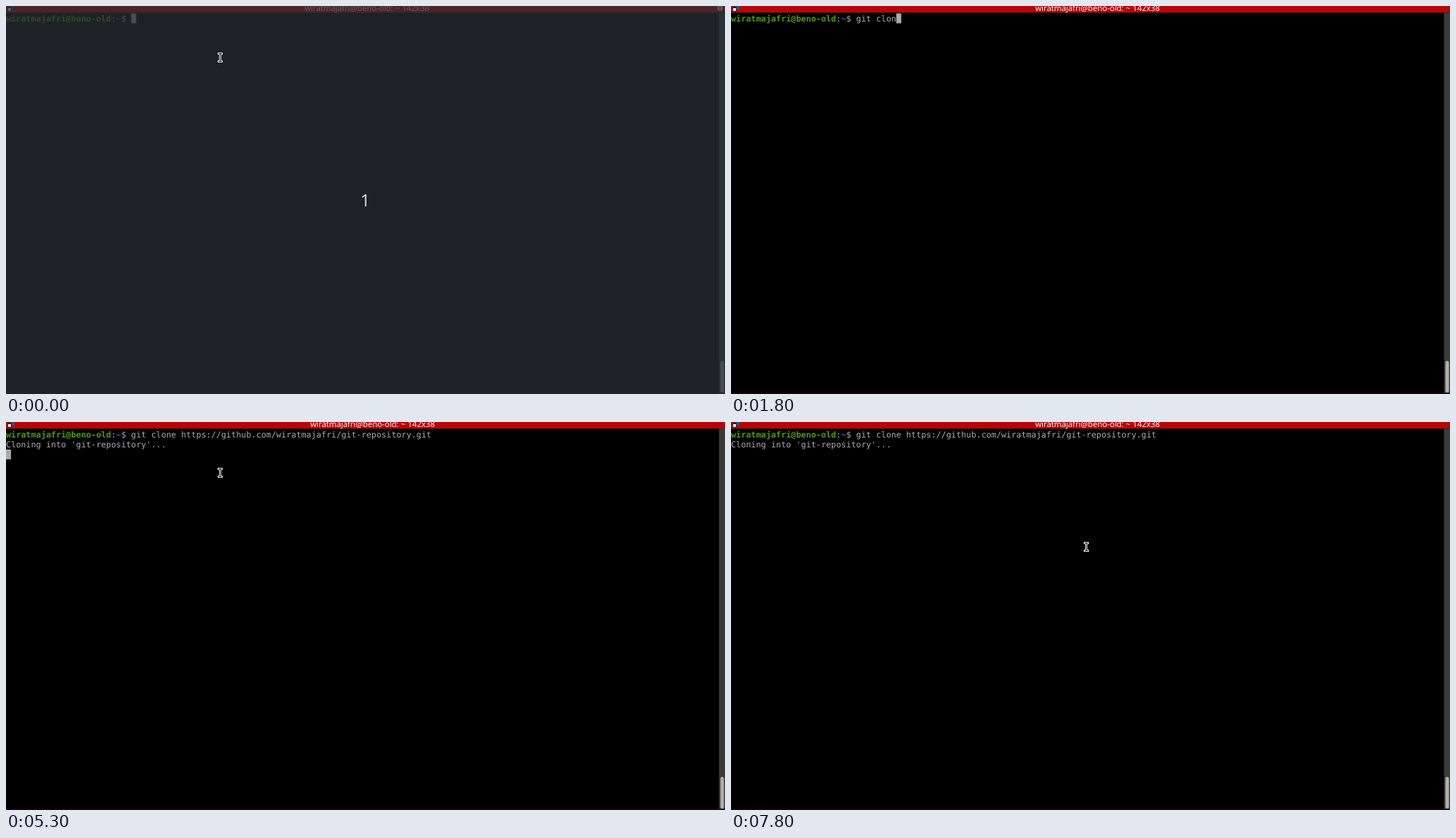
An HTML page for the animation above (8 s loop, 1019 by 550 pixels).

```html
<!DOCTYPE html>
<html lang="en">
<head>
<meta charset="utf-8">
<title>Cloning a repository</title>
<style>
  html, body { margin: 0; width: 100%; height: 100%; overflow: hidden; background: #000; }
  svg { display: block; width: 1019px; height: 550px; }
  text { white-space: pre; text-rendering: geometricPrecision; }
  .mono { font: 11.79px "DejaVu Sans Mono", monospace; fill: #aaa; }
  .user { font-weight: bold; fill: #4e9a06; }
  .path { font-weight: bold; fill: #3465a4; }
  .title { font: 11.45px "Open Sans", "Noto Sans", sans-serif; fill: #fff; text-anchor: middle; }
  .count { font: 24px "Noto Sans", "Open Sans", sans-serif; fill: #d3d4d5; text-anchor: middle; }
</style>
</head>
<body>
<svg viewBox="0 0 1019 550">
  <rect width="1019" height="550"/>

  <!-- title bar -->
  <rect width="1019" height="9.5" fill="#b90408"/>
  <rect x="7" width="5" height="5" fill="#26588c"/>
  <rect x="2" y="1" width="6" height="7" fill="#222"/>
  <rect x="3" y="3" width="4" height="4" fill="#eee"/>
  <text class="title" id="title" y="7">wiratmajafri@beno-old: ~ 142x38</text>
  <g id="badge">
    <circle cx="1012" cy="3" r="4" fill="#ddd"/>
    <path d="M1010 2h4M1012 2v4" stroke="#555"/>
  </g>

  <!-- scroll bar and lower edge -->
  <rect x="1010.5" y="9.5" width="8.5" height="540.5" fill="#3c3b37"/>
  <rect x="1012.5" y="503" width="5" height="45" rx="2.5" fill="#b3b0ab"/>
  <rect y="548.5" width="1019" height="1.5" fill="#1c060c"/>

  <!-- terminal -->
  <text class="mono" y="22"><tspan class="user">wiratmajafri@beno-old</tspan>:<tspan class="path">~</tspan>$ <tspan id="typed"></tspan></text>
  <text class="mono" id="output" y="36.2">Cloning into 'git-repository'...</text>
  <rect id="block" width="7.1" height="14" fill="#aaa"/>

  <!-- countdown veil -->
  <g id="veil">
    <rect width="1019" height="550" fill="#292e33" opacity=".75"/>
    <text class="count" x="509" y="284">1</text>
  </g>

  <g id="mouse" fill="none" stroke-linecap="square">
    <path d="M-2-5.5H2M0-5.5V5.5M-2 5.5H2" stroke="#fff" stroke-width="3"/>
    <path d="M-2-5.5H2M0-5.5V5.5M-2 5.5H2" stroke="#000"/>
  </g>
</svg>
<script>
  const LOOP = 8000, CELL = 7.098, PROMPT = 25, ENTER = 3700;
  const command = "git clone https://github.com/wiratmajafri/git-repository.git";
  const el = id => document.getElementById(id);
  const [title, badge, typed, output, block, veil, mouse] =
    ["title", "badge", "typed", "output", "block", "veil", "mouse"].map(el);

  // [time, number of typed characters]
  const keys = [[0, 0], [400, 1], [600, 2], [700, 3], [900, 4], [1300, 5], [1500, 6],
    [1600, 7], [1800, 8], [2000, 9], [2100, 10], [2700, command.length]];

  // [time, block visible]
  const blinks = [[0, true], [3000, false], [3600, true], [4200, false], [4800, true],
    [5400, false], [6000, true], [6600, false], [7200, true], [7800, false]];

  // [time, pointer position or null while hidden]
  const moves = [[0, [303.5, 73]], [500, null], [5300, [303.5, 72]],
    [5800, [351.5, 97]], [5900, [451.5, 150]], [6000, [503.5, 177]]];

  const at = (steps, t) => steps.findLast(step => t >= step[0])[1];
  const show = (node, on) => node.setAttribute("visibility", on ? "visible" : "hidden");

  function draw(t) {
    const count = at(keys, t), spot = at(moves, t), entered = t >= ENTER;
    typed.textContent = command.slice(0, count);
    title.setAttribute("x", t < 300 ? 511.5 : 519.5);
    block.setAttribute("x", entered ? 0 : (PROMPT + count) * CELL);
    block.setAttribute("y", entered ? 39 : 10.5);
    if (spot) mouse.setAttribute("transform", `translate(${spot})`);
    show(mouse, spot);
    show(block, at(blinks, t));
    show(output, entered);
    show(badge, t < 300);
    show(veil, t < 100);
  }

  function tick() {
    draw(performance.now() % LOOP);
    requestAnimationFrame(tick);
  }
  tick();
</script>
</body>
</html>
```
